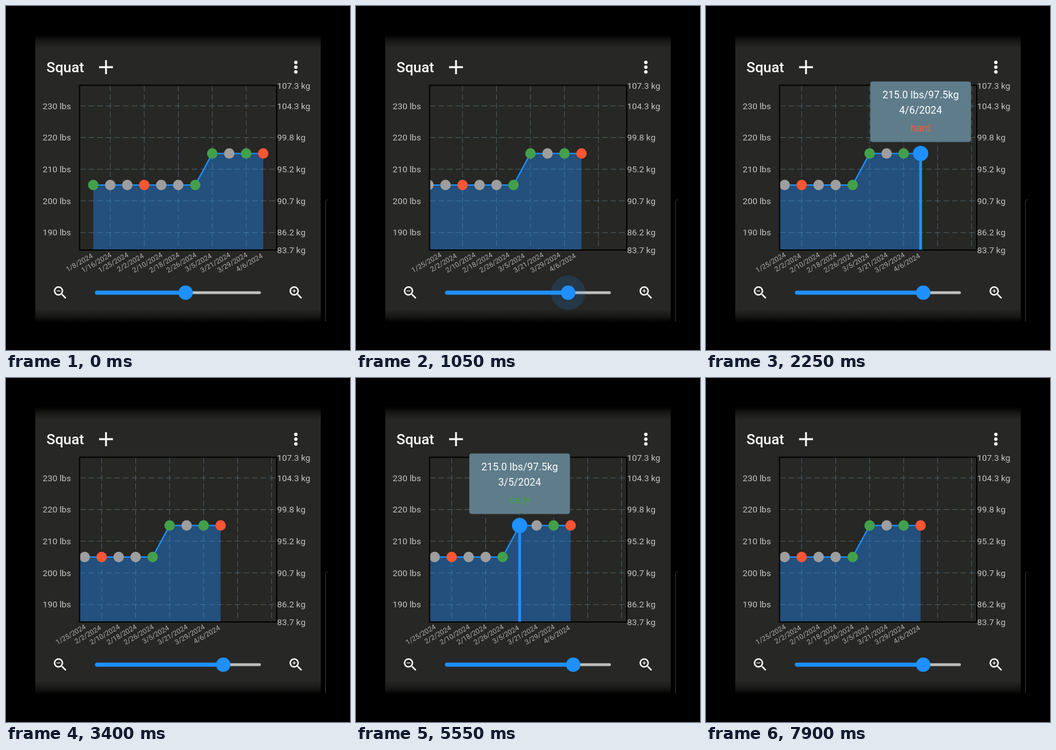
An HTML page for the animation above (8000 ms loop, 540 by 540 pixels).

```html
<!DOCTYPE html>
<html lang="en">
<head>
<meta charset="utf-8">
<title>Squat progress</title>
<style>
  html, body { margin: 0; width: 100%; height: 100%; overflow: hidden; background: #000; }
  svg { display: block; width: 100vw; height: 100vh; font-family: Roboto, sans-serif; }
  .axis { font-size: 13.7px; fill: #c3c3c2; }
  .date { font-size: 11px; fill: #adadac; text-anchor: middle; }
  .grid { stroke: #607d8b; stroke-opacity: .62; stroke-width: 1; stroke-dasharray: 9 4.5; }
  #tip text { font-size: 16px; fill: #fff; text-anchor: middle; }
</style>
</head>
<body>
<svg viewBox="0 0 540 540">
  <defs>
    <linearGradient id="panelFill" x1="0" y1="0" x2="0" y2="1">
      <stop offset="0" stop-color="#000"/>
      <stop offset=".022" stop-color="#171716"/>
      <stop offset=".045" stop-color="#272725"/>
      <stop offset=".952" stop-color="#272725"/>
      <stop offset=".978" stop-color="#171716"/>
      <stop offset="1" stop-color="#000"/>
    </linearGradient>
    <clipPath id="plotClip"><rect x="116" y="60" width="309.5" height="323"/></clipPath>
    <path id="lens" d="M15.5 14h-.79l-.28-.27C15.41 12.59 16 11.11 16 9.5 16 5.91 13.09 3 9.5 3S3 5.91 3 9.5 5.91 16 9.5 16c1.61 0 3.09-.59 4.23-1.57l.27.28v.79l5 4.99L20.49 19l-4.99-5zm-6 0C7.01 14 5 11.99 5 9.5S7.01 5 9.5 5 14 7.01 14 9.5 11.99 14 9.5 14z"/>
  </defs>

  <rect x="46" y="45" width="448" height="452" fill="url(#panelFill)"/>
  <path d="M505 304Q501.500 304 501.500 309V495" fill="none" stroke="#393938"/>

  <text x="63.500" y="104" font-size="22.700" font-weight="500" fill="#fff">Squat</text>
  <path d="M157 86.500v19M147.500 96h19" stroke="#fff" stroke-width="2.800" stroke-linecap="square"/>
  <g fill="#fff">
    <circle cx="455" cy="88.500" r="2.700"/><circle cx="455" cy="96" r="2.700"/><circle cx="455" cy="103.500" r="2.700"/>
  </g>

  <g id="axes"></g>
  <g clip-path="url(#plotClip)">
    <g id="verticals"></g>
    <g id="series"></g>
  </g>
  <rect x="115.500" y="124.500" width="309.500" height="258.500" fill="none" stroke="#000" stroke-width="1.800"/>
  <g id="dates"></g>

  <g id="tip">
    <path id="stem" stroke="#1e90ff" stroke-width="4.400"/>
    <circle id="picked" r="12" fill="#1e90ff"/>
    <g id="bubble">
      <rect x="-79" y="-113" width="158" height="95" rx="4" fill="#5f7c8a"/>
      <text id="weight" y="-86.500"/>
      <text id="day" y="-62.500"/>
      <text id="effort" y="-34.500"/>
    </g>
  </g>

  <g stroke-linecap="round">
    <path d="M142 450H398" stroke="#bdbdb9" stroke-width="4.400"/>
    <path id="track" stroke="#1e90ff" stroke-width="6.600"/>
  </g>
  <circle id="halo" cy="450" fill="#1e90ff" fill-opacity=".16"/>
  <circle id="thumb" cy="450" r="11.300" fill="#1e90ff"/>
  <g fill="#fff">
    <g transform="translate(71.800 436.600) scale(1.120)"><use href="#lens"/><path d="M7 9h5v1H7z"/></g>
    <g transform="translate(441.800 436.600) scale(1.120)"><use href="#lens"/><path d="M12 10h-2v2H9v-2H7V9h2V7h1v2h2v1z"/></g>
  </g>
</svg>
<script>
const LOOP = 8000, TOP = 125, BOTTOM = 382.5, STEP = 26.68, FIRST_X = 137;
const BLUE = '#1e90ff';
const EFFORTS = {
  e: { color: '#43a04a', name: 'easy' },
  m: { color: '#9e9e9e', name: 'medium' },
  h: { color: '#ff5533', name: 'hard' }
};
const days = '1/8 1/16 1/25 2/2 2/10 2/18 2/26 3/5 3/21 3/29 4/6'.split(' ');
const points = days.map((day, i) => ({
  day: day + '/2024',
  x: FIRST_X + STEP * i,
  y: i < 7 ? 281 : 231.5,
  weight: i < 7 ? '205.0 lbs/93.0kg' : '215.0 lbs/97.5kg',
  effort: EFFORTS['emmhmmeemeh'[i]]
}));

// Time and value pairs, linear between them.
const thumbPath = [[50, 282], [500, 310], [1050, 333], [1450, 341]];
const panPath = [[100, 0], [500, 25.2], [1050, 49.8], [1550, 66], [1800, 66.9]];
const haloPath = [[50, 0], [200, 27], [1350, 27], [1500, 0]];
// Start, end and chosen point of each tooltip.
const picks = [[2200, 3400, 10], [3450, 4450, 9], [4550, 5450, 8],
               [5550, 6250, 7], [6350, 7050, 6], [7150, 7750, 5]];

const $ = id => document.getElementById(id);

function add(parent, tag, attrs, text) {
  const el = document.createElementNS('http://www.w3.org/2000/svg', tag);
  set(el, attrs);
  if (text) el.textContent = text;
  return parent.appendChild(el);
}

function set(el, attrs) {
  for (const key in attrs) el.setAttribute(key, attrs[key]);
}

function at(path, t) {
  if (t <= path[0][0]) return path[0][1];
  for (let i = 1; i < path.length; i++) {
    const [t0, v0] = path[i - 1], [t1, v1] = path[i];
    if (t < t1) return v0 + (v1 - v0) * (t - t0) / (t1 - t0);
  }
  return path[path.length - 1][1];
}

const axisLabel = (x, y, text) => add($('axes'), 'text', { class: 'axis', x, y: y + 4.8 }, text);
['104.3', '99.8', '95.2', '90.7', '86.2'].forEach((kg, i) => {
  const y = 156.8 + 49.7 * i;
  add($('axes'), 'path', { class: 'grid', d: `M116 ${y}H425` });
  axisLabel(57.5, y, 230 - 10 * i + ' lbs');
  axisLabel(425.5, y, kg + ' kg');
});
axisLabel(425.5, 125, '107.3 kg');
axisLabel(425.5, 382.8, '83.7 kg');

for (let i = 1; i < 15; i += 2) {
  const x = FIRST_X + STEP * i;
  add($('verticals'), 'path', { class: 'grid', d: `M${x} ${TOP}V${BOTTOM}` });
}

const line = 'M' + points.map(p => `${p.x} ${p.y}`).join('L');
add($('series'), 'path', { d: `${line}V${BOTTOM}H${FIRST_X}Z`, fill: BLUE, 'fill-opacity': .4 });
add($('series'), 'path', { d: line, fill: 'none', stroke: BLUE, 'stroke-width': 2.2 });
points.forEach(p => add($('series'), 'circle', { cx: p.x, cy: p.y, r: 8.2, fill: p.effort.color }));
const dates = points.map(p => add($('dates'), 'text', { class: 'date' }, p.day));

function drawTip(t, pan) {
  const pick = picks.find(([start, end]) => t >= start && t < end);
  $('tip').style.display = pick ? '' : 'none';
  if (!pick) return;
  const p = points[pick[2]], x = p.x - pan;
  set($('stem'), { d: `M${x} ${p.y}V${BOTTOM}` });
  set($('picked'), { cx: x, cy: p.y });
  set($('bubble'), { transform: `translate(${x} ${p.y})` });
  $('weight').textContent = p.weight;
  $('day').textContent = p.day;
  $('effort').textContent = p.effort.name;
  $('effort').style.fill = p.effort.color;
}

function draw(now) {
  const t = now % LOOP;
  const thumb = at(thumbPath, t), pan = at(panPath, t);
  const shift = `translate(${-pan} 0)`;
  set($('verticals'), { transform: shift });
  set($('series'), { transform: shift });

  // Date labels follow the thumb at once; the plot trails behind.
  const datePan = (thumb - 282) * 66.9 / 59;
  dates.forEach((label, i) => {
    const x = points[i].x - datePan;
    set(label, { transform: `translate(${x - 20} 406) rotate(-30)` });
    label.style.display = x < 116 ? 'none' : '';
  });

  set($('track'), { d: `M143 450H${thumb}` });
  set($('thumb'), { cx: thumb });
  set($('halo'), { cx: thumb, r: at(haloPath, t) });
  drawTip(t, pan);
}

const started = performance.now();
function tick() {
  draw(performance.now() - started);
  requestAnimationFrame(tick);
}
tick();
</script>
</body>
</html>
```
